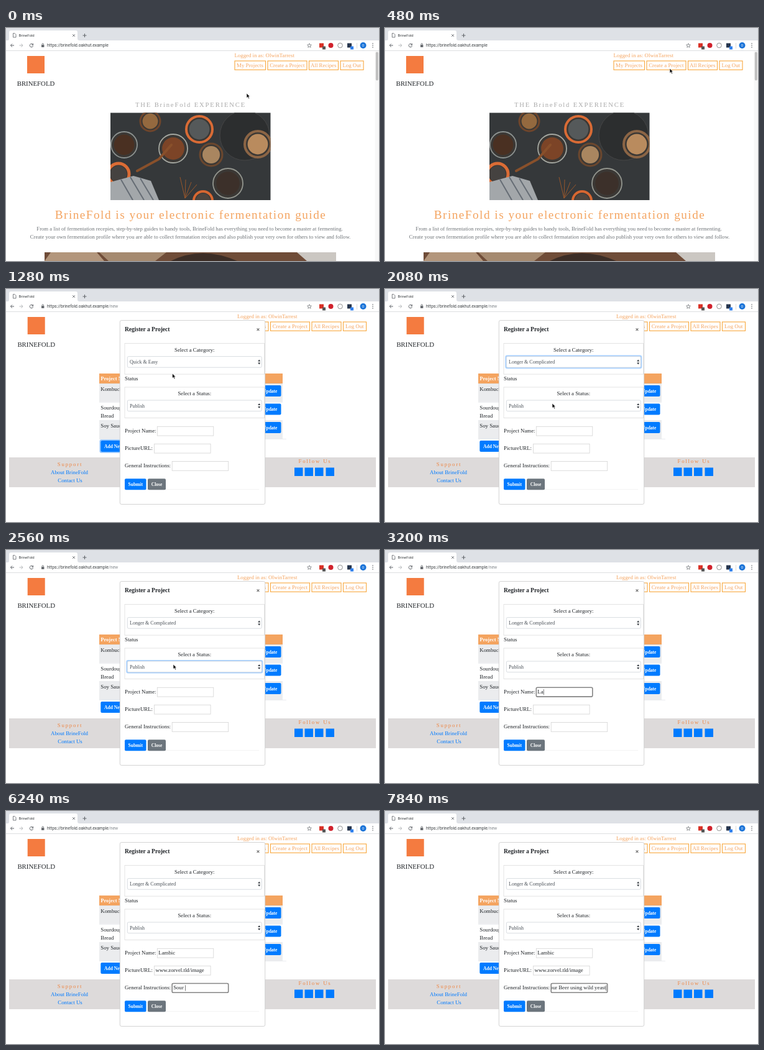
An HTML page that plays this animation: 600x375 px, repeating every 8000 ms.

```html
<!DOCTYPE html>
<html lang="en">
<head>
<meta charset="utf-8">
<title>BrineFold</title>
<style>
  html, body { margin: 0; width: 100%; height: 100%; overflow: hidden; background: #fff; }
  #stage { display: block; width: 100vw; height: 100vh; }
  text { font: 8.8px "Liberation Serif", serif; fill: #212529; white-space: pre; }
  .ui { font: 6.8px Roboto, sans-serif; fill: #3c4043; }
  .sandy { fill: #f4a460; }
  .link { fill: #007bff; }
  .bold { font-size: 8.5px; font-weight: bold; }
  .white { fill: #fff; }
  .button { font-size: 7.5px; font-weight: bold; fill: #fff; }
  .body { font-size: 8.67px; fill: #6f7478; }
  .spaced { letter-spacing: 1.8px; fill: #ee8644; }
  .option { font-size: 8px; fill: #495057; }
  .mid { text-anchor: middle; }
</style>
</head>
<body>
<svg id="stage" viewBox="0 0 600 375" preserveAspectRatio="none"></svg>
<script>
const LOOP = 8000, STEP = 160;
const BLUE = '#007bff', SANDY = '#f4a460', LOGO = '#f47b40';
const ADDRESS = 'https://brinefold.oakhut.example';

const esc = s => s.replace(/&/g, '&amp;');
const text = (x, y, s, cls = '', attrs = '') =>
  `<text x="${x}" y="${y}" class="${cls}" ${attrs}>${esc(s)}</text>`;
const rect = (x, y, w, h, fill, attrs = '') =>
  `<rect x="${x}" y="${y}" width="${w}" height="${h}" fill="${fill}" ${attrs}/>`;
const circle = (x, y, r, fill, attrs = '') =>
  `<circle cx="${x}" cy="${y}" r="${r}" fill="${fill}" ${attrs}/>`;
const path = (d, stroke, width = 1, fill = 'none', attrs = '') =>
  `<path d="${d}" fill="${fill}" stroke="${stroke}" stroke-width="${width}" ${attrs}/>`;
const shape = (d, fill) => path(d, 'none', 0, fill);
const group = (id, body) => `<g id="${id}">${body}</g>`;
const button = (x, y, w, label, fill = BLUE) =>
  rect(x, y, w, 18, fill, 'rx="2"') + text(x + w / 2, y + 11.6, label, 'button mid');
const ring = (id, x, y, w, h, color, width) =>
  rect(x, y, w, h, 'none', `id="${id}" rx="2" stroke="${color}" stroke-width="${width}"`);

function browser() {
  const tools =
    path('M13 28H7.5M10 25.4L7.4 28L10 30.6', '#5f6368', 1) +
    path('M21.5 28H27M24.5 25.4L27.1 28L24.5 30.6', '#b4b7ba', 1) +
    path('M43 26.3A2.7 2.7 0 1 0 43.6 28.7M43.6 25V27.3H41.3', '#5f6368', 1);
  const star = 'M488 24.8L489 27L491.4 27.2L489.6 28.8L490.2 31.2L488 29.9L485.8 31.2L486.4 28.8L484.6 27.2L487 27Z';
  return rect(0, 0, 600, 20, '#dee1e6') +
    shape('M3 20Q5 20 5 17V7Q5 4 8 4H112Q115 4 115 7V17Q115 20 118 20Z', '#fff') +
    path('M11.5 8.5H14L16 10.5V15H11.5Z', '#5f6368', .8) +
    text(20.5, 14, 'BrineFold', 'ui', 'style="font-size:6px"') +
    path('M107 10L111 14M111 10L107 14', '#5f6368', .8) +
    path('M123.5 12H129.5M126.5 9V15', '#5f6368', 1) +
    rect(0, 20, 600, 16.5, '#fff') + tools +
    rect(57, 27.2, 4.4, 3.6, '#5f6368') + path('M58 27.2V26A1.2 1.2 0 0 1 60.4 26V27.2', '#5f6368', .8) +
    `<text id="url" x="66" y="30.3" class="ui"></text>` +
    path(star, '#5f6368', .7) +
    rect(504, 24.5, 7, 7, '#d93025') + rect(509, 29.5, 5, 5, '#555') +
    circle(522.5, 28, 4, '#d0202b') + circle(537.5, 28, 3.8, '#fff', 'stroke="#777" stroke-width=".8"') +
    rect(549, 24.5, 7, 7, '#26354d') + rect(554, 29.5, 5, 5, '#2f80ed') +
    rect(564, 24, .7, 9, '#ccc') + circle(574.5, 28, 5, '#1a73d8') +
    text(574.5, 30, 'O', 'ui white mid', 'style="font-size:5.5px"') +
    [25, 28, 31].map(y => circle(590, y, .8, '#5f6368')).join('') +
    rect(0, 36.2, 600, .8, '#d5d7da');
}

function header(left, logoX) {
  const items = [['My Projects', 0, 50], ['Create a Project', 53, 63.5], ['All Recipes', 119.5, 47.5], ['Log Out', 170, 37.5]];
  return rect(logoX - 14, 45, 28, 28, LOGO) +
    text(logoX, 92.5, 'BRINEFOLD', 'mid', 'style="font-size:10.8px"') +
    text(left, 47.3, 'Logged in as: OlwinTarrest', 'sandy') +
    items.map(([label, x, w]) =>
      rect(left + x + .5, 53, w - .5, 14.3, '#fff', 'stroke="#f8a73c" stroke-width="1.1"') +
      text(left + x + w / 2, 63.2, label, 'sandy mid')).join('');
}

// A round jar or bowl seen from above
const bowl = (x, y, r, rim, food, width = 1.8) =>
  circle(x, y, r, '#3b3835', `stroke="${rim}" stroke-width="${width}"`) + circle(x, y, r * .78, food);

function photo() {
  const twigs = [0, 1, 2, 3].map(i => `M288 274L${280 + i * 9} ${240 + i * 4}`).join('');
  return `<svg x="168" y="136.5" width="257.5" height="140.5" viewBox="168 136.5 257.5 140.5">` +
    rect(168, 136, 258, 142, '#35383a') +
    circle(384, 173, 40, '#2c2e2f', 'stroke="#454545" stroke-width="1"') +
    bowl(190, 188, 21, '#8c9290', '#4a3022') + bowl(232, 150, 16, '#6f452b', '#94693f', 3) +
    bowl(269, 194, 23, '#a4a7a0', '#7c4427') + bowl(311, 163, 21, '#d96b35', '#55595a', 4) +
    bowl(330, 204, 18, '#6b472e', '#a98660', 3) + bowl(405, 187, 21, '#8c6545', '#b98b5e', 4) +
    bowl(357, 250, 24, '#92958e', '#3c302a') + bowl(181, 235, 17, '#db6c35', '#454240', 5) +
    bowl(317, 278, 15, '#d76731', '#4d453f', 4) +
    path('M211 230L246 211L266 188', '#89502b', 4, 'none', 'stroke-linecap="round"') +
    shape('M168 248L205 238L233 246L246 277H168Z', '#a3a7aa') +
    path('M185 244L204 277M200 240L222 277M216 242L237 277', '#666d75', 2) +
    path(twigs, '#97562c', 1) + '</svg>';
}

function home() {
  return rect(0, 37, 600, 338, '#fff') + header(367.5, 48) +
    text(297, 127, 'THE BrineFold EXPERIENCE', 'mid', 'style="font-size:10.6px;letter-spacing:1.85px;fill:#aaa"') +
    photo() +
    text(297, 307, 'BrineFold is your electronic fermentation guide', 'sandy mid', 'style="font-size:19.2px;letter-spacing:1.5px"') +
    text(295.5, 326, 'From a list of fermentation recepies, step-by-step guides to handy tools, BrineFold has everything you need to become a master at fermenting.', 'body mid') +
    text(296.5, 339, 'Create your own fermentation profile where you are able to collect fermatation recipes and also publish your very own for others to view and follow.', 'body mid') +
    rect(62, 361, 469, 14, '#6f4c38') +
    shape('M62 375L72 361H146L158 375Z', '#b3967c') +
    shape('M150 361H258L240 375H165Z', '#a58a70') +
    shape('M265 375Q315 350 372 375Z', '#3c2d26') +
    shape('M468 361H531V375H484Z', '#cbc7c2') +
    rect(593.5, 37, 6.5, 338, '#f7f7f7') + rect(594.8, 38.5, 4, 46, '#bfbfbf', 'rx="2"');
}

function projects() {
  const rows = [
    [['Kombucha'], ['Culture Mother, Food, Ferment', '& Bottle']],
    [['Sourdough', 'Bread'], ['Make a starter, Bake Bread']],
    [['Soy Sauce'], ['Bury in backyard']]
  ];
  const table = rows.map(([name, notes], i) => {
    const y = 152.3 + i * 29.6;
    const lines = (x, list, cls) => list.map((s, k) => text(x, y + 11.7 + k * 13, s, cls)).join('');
    return rect(150, y, 295, 29.6, i % 2 ? '#fff' : '#ebecee') + rect(150, y, 295, .6, '#dee2e6') +
      lines(152.3, name) + lines(207.3, notes) + lines(327.3, ['Add new', 'task'], 'link') +
      button(370, y + 2.6, 33, 'Delete') + button(407, y + 2.6, 35.5, 'Update');
  }).join('');
  return rect(0, 37, 600, 338, '#fff') + header(372, 48.7) +
    text(300, 127, 'Add New Project', 'mid', 'style="font-size:19.6px"') +
    rect(150, 136, 295, 16.5, SANDY) +
    text(152.3, 147, 'Project Name', 'bold white') + text(225, 147, 'General Instructions', 'bold white') +
    table + rect(150, 241, 301, .6, '#dee2e6') +
    ring('addFocus', 151.5, 243.3, 68, 19.4, '#8fc3ff', 2) + button(152.3, 244, 66.5, 'Add New Project') +
    rect(5, 271, 590, 48, '#dddada') +
    text(103, 285, 'Support', 'spaced mid') + text(300.5, 285, 'Tools', 'spaced mid') +
    text(497, 280, 'Follow Us', 'spaced mid') +
    text(102, 298, 'About BrineFold', 'link mid') + text(103, 311, 'Contact Us', 'link mid') +
    text(300, 298, 'FAQs', 'link mid') +
    [464, 480.5, 497, 514.5].map(x => rect(x, 287.5, 13.5, 13.5, BLUE)).join('');
}

// Times in ms: focus, first key, and time per key
const fields = [
  { id: 'name', label: 'Project Name:', x: 243.3, y: 221.3, value: 'Lambic', focus: 2880, start: 3000, pace: 95 },
  { id: 'picture', label: 'PictureURL:', x: 238.6, y: 249.3, value: 'www.zorvel.tld/image', focus: 3680, start: 3840, pace: 95 },
  { id: 'notes', label: 'General Instructions:', x: 267.2, y: 277.5, value: 'Sour Beer using wild yeast', focus: 5760, start: 5840, pace: 75 }
];
const FIELD_WIDTH = 90.5;

function modal() {
  const select = (id, y, label, value) =>
    rect(191, y, 224.6, 49.5, '#fff', 'stroke="#dcdcdc" stroke-width=".8"') +
    text(303.3, y + 13.3, label, 'mid') +
    ring(id + 'Focus', 194.6, y + 20.3, 217.4, 19, '#a9d1ff', 2.6) +
    rect(195.3, y + 21, 216, 17.6, '#fff', 'rx="2" stroke="#ced4da" stroke-width=".8"') +
    text(199, y + 32.5, value, 'option', `id="${id}"`) +
    shape(`M405.2 ${y + 29}L407.2 ${y + 26}L409.2 ${y + 29}ZM405.2 ${y + 31}L407.2 ${y + 34}L409.2 ${y + 31}Z`, '#343a40');
  const input = f => text(191, f.y + 9.8, f.label) +
    rect(f.x, f.y, FIELD_WIDTH, 14.8, '#fff', 'stroke="#d4d4d4" stroke-width=".8"') +
    ring(f.id + 'Focus', f.x, f.y, FIELD_WIDTH, 14.8, '#858585', 1.6) +
    `<svg x="${f.x + 1}" y="${f.y}" width="${FIELD_WIDTH - 2}" height="15">` +
    `<text id="${f.id}" y="9.8"></text>` + rect(0, 2.8, .6, 9.2, '#222', `id="${f.id}Caret"`) + '</svg>';
  return rect(183.3, 50.5, 233.4, 296, '#fff', 'rx="2.5" stroke="#d0d0d0" stroke-width=".9"') +
    text(191, 68.3, 'Register a Project', 'bold', 'style="font-size:9.5px"') +
    path('M403.6 63.3L407.4 67.1M407.4 63.3L403.6 67.1', '#666', 1.1) +
    select('category', 87.6, 'Select a Category:', 'Quick & Easy') +
    text(191, 147.3, 'Status') +
    select('status', 158, 'Select a Status:', 'Publish') +
    fields.map(input).join('') +
    rect(191, 322.6, 216, .5, '#e6e6e6') +
    button(191, 305.2, 34.5, 'Submit') + button(228, 305.2, 29, 'Close', '#6c757d');
}

const stage = document.getElementById('stage');
stage.innerHTML = rect(0, 0, 600, 375, '#fff') + group('home', home()) + group('projects', projects()) +
  group('modal', modal()) + browser() +
  path('M0 0V7.6L1.8 6L3.1 8.8L4.5 8.2L3.2 5.5H5.5Z', '#fff', .6, '#111', 'id="cursor"');

const el = id => document.getElementById(id);
const show = (id, on) => { el(id).style.display = on ? '' : 'none'; };
const within = (t, from, to) => t >= from && t < to;

// Cursor waypoints: time, x, y
const route = [
  [0, 387, 105], [320, 458, 65], [640, 458, 65], [960, 190, 252], [1120, 190, 252],
  [1280, 267.5, 136], [1440, 270, 117], [1920, 270, 124], [2080, 269, 184],
  [2560, 269, 184], [2880, 279, 228]
];

function cursorAt(t) {
  const next = route.findIndex(p => p[0] > t);
  if (next < 0) return route[route.length - 1].slice(1);
  const [t0, x0, y0] = route[next - 1], [t1, x1, y1] = route[next];
  const k = (t - t0) / (t1 - t0), e = k * k * (3 - 2 * k);
  return [x0 + (x1 - x0) * e, y0 + (y1 - y0) * e];
}

function typeField(f, t, end) {
  const count = Math.max(0, Math.min(f.value.length, Math.floor((t - f.start) / f.pace)));
  const focused = within(t, f.focus, end), node = el(f.id);
  node.textContent = f.value.slice(0, count);
  const width = count ? node.getComputedTextLength() : 0;
  const x = focused ? Math.min(1, FIELD_WIDTH - 3.5 - width) : 1;
  node.setAttribute('x', x);
  el(f.id + 'Caret').setAttribute('x', x + width + .3);
  show(f.id + 'Caret', focused);
  show(f.id + 'Focus', focused);
}

function draw(now) {
  const t = Math.floor(now % LOOP / STEP) * STEP;
  const onHome = t < 640;
  show('home', onHome);
  show('projects', !onHome);
  show('modal', t >= 1280);
  el('url').innerHTML = ADDRESS + (onHome ? '' : '<tspan fill="#80868b">/new</tspan>');
  show('addFocus', within(t, 1120, 1440));
  show('categoryFocus', within(t, 1440, 2240));
  show('statusFocus', within(t, 2240, 2880));
  el('category').textContent = t < 1920 ? 'Quick & Easy' : 'Longer & Complicated';
  fields.forEach((f, i) => typeField(f, t, fields[i + 1] ? fields[i + 1].focus : LOOP));
  const [x, y] = cursorAt(t);
  el('cursor').setAttribute('transform', `translate(${x} ${y})`);
  show('cursor', t < 3040);
  requestAnimationFrame(draw);
}
requestAnimationFrame(draw);
</script>
</body>
</html>
```
